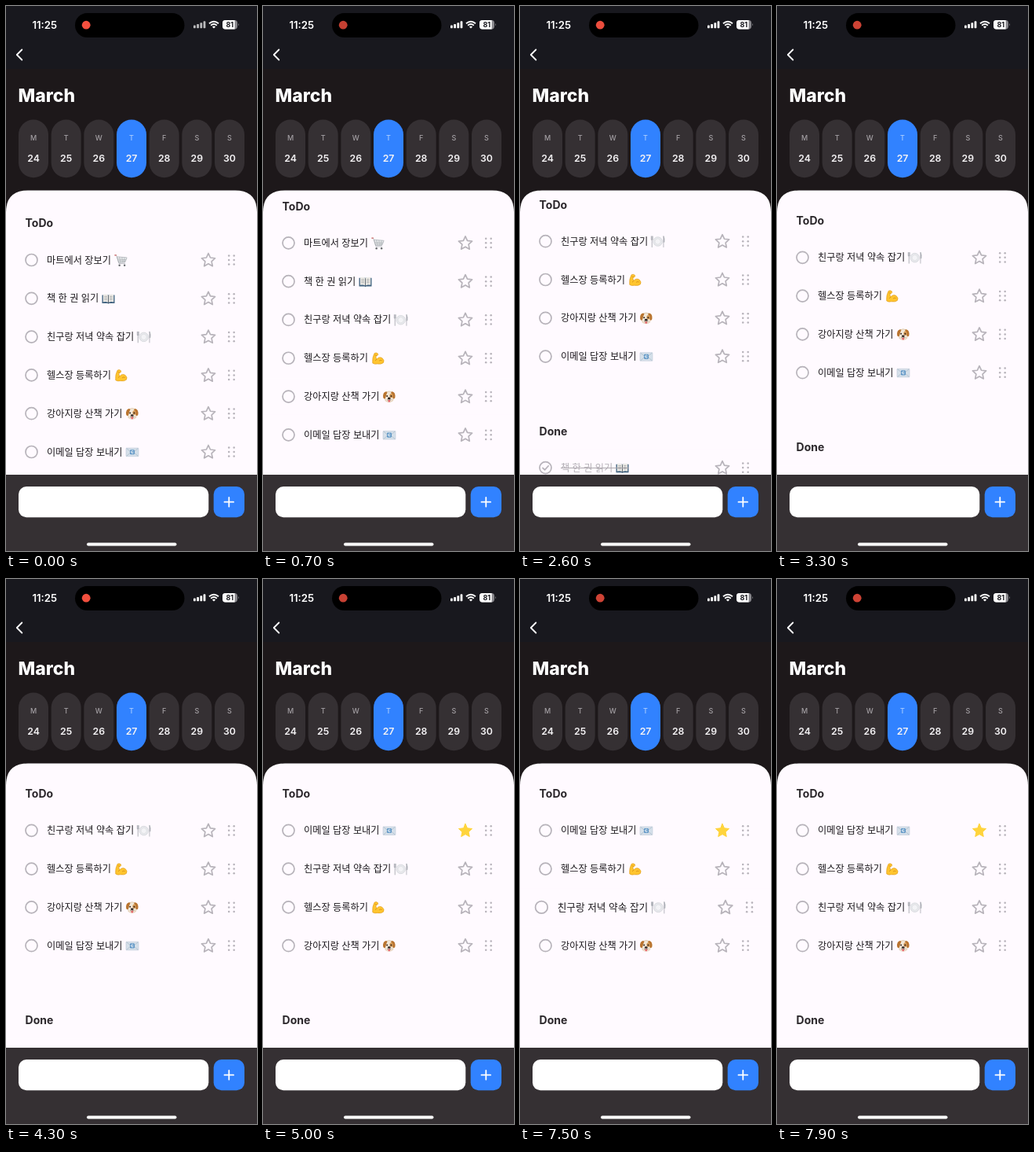
These frames come from a looping animation (320x693 px, 8 s). An HTML page:

```html
<!DOCTYPE html>
<html lang="ko">
<head>
<meta charset="utf-8">
<title>ToDo</title>
<style>
  html, body { margin: 0; width: 100%; height: 100%; overflow: hidden; background: #1d181a; }
  svg { display: block; }
  text { font-family: Inter, "Noto Sans", sans-serif; }
  .mid { text-anchor: middle; }
  .head { font-size: 14px; font-weight: 700; fill: #2b272b; }
  .label { font: 400 12.2px "Noto Sans CJK KR", "Noto Sans CJK", "Noto Sans CJK JP", sans-serif; fill: #1c191d; }
  .line { fill: none; stroke: #b7b3ba; stroke-width: 1.7; stroke-linejoin: round; stroke-linecap: round; }
  .dots { fill: #b7b3ba; }
  .tick { display: none; }
  .done .tick { display: inline; }
  .done .label { fill: #b3afb5; }
  .starred .star { fill: #ffd43c; stroke: #ffd43c; stroke-width: 1; }
</style>
</head>
<body>
<svg width="320" height="693" viewBox="0 0 320 693">
  <defs>
    <clipPath id="sheet"><path d="M0 596V262.6Q0 234.6 28 234.6H292Q320 234.6 320 262.6V596Z"/></clipPath>
  </defs>
  <rect width="320" height="693" fill="#1d181a"/>
  <rect width="320" height="80" fill="#18181e"/>

  <text class="mid" x="49.3" y="28.5" font-size="13.2" font-weight="600" fill="#fff">11:25</text>
  <rect x="88" y="9" width="139.5" height="31" rx="15.5" fill="#000"/>
  <circle id="rec" cx="102.2" cy="24.2" r="5.4" fill="#f5503f"/>
  <g id="signal" fill="#fff">
    <rect x="239" y="24.6" width="2.8" height="3.6" rx=".8"/>
    <rect x="243.2" y="22.9" width="2.8" height="5.3" rx=".8"/>
    <rect x="247.4" y="21.2" width="2.8" height="7" rx=".8"/>
    <rect x="251.6" y="19.2" width="2.8" height="9" rx=".8"/>
  </g>
  <g fill="none" stroke="#fff" stroke-width="1.9">
    <path d="M259 22.3Q265 17 271 22.3M261.2 24.7Q265 21.4 268.8 24.7"/>
    <path d="M265 28.6L262.9 26.4Q265 24.8 267.1 26.4Z" fill="#fff" stroke="none"/>
  </g>
  <rect x="276" y="18" width="19" height="11.4" rx="3.6" fill="#88878c"/>
  <path d="M291.6 18H279.6Q276 18 276 21.6V25.8Q276 29.4 279.6 29.4H291.6Z" fill="#fff"/>
  <path d="M296 21.8Q297.8 23.7 296 25.6Z" fill="#88878c"/>
  <text class="mid" x="285.4" y="27.1" font-size="9" font-weight="700" fill="#18181e">81</text>

  <path d="M20.3 55.5L13.8 62L20.3 68.5" fill="none" stroke="#fff" stroke-width="1.8" stroke-linecap="round" stroke-linejoin="round"/>
  <text x="15.6" y="122.3" font-size="23" font-weight="800" fill="#fff">March</text>
  <g id="week"></g>

  <g clip-path="url(#sheet)">
    <rect y="234" width="320" height="362" fill="#fffaff"/>
    <g id="list"></g>
  </g>

  <rect y="596" width="320" height="97" fill="#353033"/>
  <rect x="16" y="611" width="242.3" height="39.3" rx="10" fill="#fff"/>
  <rect x="264.7" y="611" width="39.3" height="39.3" rx="10" fill="#3182ff"/>
  <path d="M278.5 630.7H290.1M284.3 624.9V636.5" stroke="#fff" stroke-width="1.8" stroke-linecap="round"/>
  <rect x="103" y="682.6" width="114.5" height="4" rx="2" fill="#fff"/>
</svg>
<script>
const LOOP = 8000, ROW = 48.8, TOP = 319.8, HEAD = 273.3;
const $ = id => document.getElementById(id);
const clamp = x => Math.max(0, Math.min(1, x));
const ease = x => x * x * (3 - 2 * x);
const ramp = (t, a, b) => ease(clamp((t - a) / (b - a)));

// Emoji are drawn around their own centre, about 17 units wide
const icons = {
  cart: `<path d="M-5.5-4.8L8.2-3.6L5.6 2.8L-3 3.4Z" fill="#eceef0" stroke="#a4a9ae" stroke-width=".8"/>
    <path d="M-8.2-7H-6.4L-2.6 4.6H6M-4.6-1.5L7.2-.8M-3.8 1L6.2 1M-2-4.4L-.5 3M1.5-4L2 3M5-3.8L4 3" fill="none" stroke="#a4a9ae" stroke-width=".7"/>
    <path d="M-8.8-7H-6" stroke="#c66" stroke-width="1.3"/>
    <circle cx="-2" cy="7" r="1.3" fill="#66696d"/><circle cx="5" cy="7" r="1.3" fill="#66696d"/>`,
  book: `<path d="M-8.6-5H8.6V6.4H1L0 7.2L-1 6.4H-8.6Z" fill="#3c5f7d"/>
    <path d="M0-4.5Q-3.5-7-7.2-5.6V4.6Q-3.5 3.6 0 5.3Q3.5 3.6 7.2 4.6V-5.6Q3.5-7 0-4.5Z" fill="#eceae6"/>
    <path d="M-5.7-3H-1.6M-5.7-.8H-1.6M-5.7 1.4H-1.6M1.6-3H5.7M1.6-.8H5.7M1.6 1.4H5.7" stroke="#9b9da0" stroke-width=".8"/>
    <path d="M0-4.5V6" stroke="#55606a"/>`,
  plate: `<circle r="6.2" fill="#e9eaee" stroke="#cfd1d6" stroke-width=".8"/><circle r="3.9" fill="#f3f3f6" stroke="#d8dade" stroke-width=".7"/>
    <path d="M-8-7.5V8M-9-7.5V-2.5H-7V-7.5" fill="none" stroke="#a1a5ac" stroke-width=".9"/>
    <path d="M7.8 8V-7.5Q9.6-4 8.8.8H7.8" fill="#b4b7bd" stroke="#a1a5ac" stroke-width=".8"/>`,
  arm: `<path d="M-7.5 6.5Q-8.3-1-5-7Q-2.5-8.5-.3-6.5Q.7-4.6-1.2-3.6L-2.8-3.2Q-3.2-.7-1.8 1Q1.7-3 5.8-.3Q9.4 3 7.2 6Q4.5 8.4-1 7.5Q-5 8.4-7.5 6.5Z" fill="#ffc52f" stroke="#d99114" stroke-width=".6"/>
    <path d="M-1.8 1Q-2.6 2.6-4 3M-4.2-4.5L-2-4M1.5 3.3Q3.8 1.6 5.4 3" fill="none" stroke="#cf8613" stroke-width=".8"/>`,
  dog: `<path d="M-5-6Q0-9 5-6Q7.5 0 5 5.5Q0 9-5 5.5Q-7.5 0-5-6Z" fill="#f2e8d8" stroke="#c9a678" stroke-width=".5"/>
    <path d="M-4-7Q-9-6-8.2 1Q-6.8 4.3-5 1.5Q-4-3-2.5-6ZM4-7Q9-6 8.2 1Q6.8 4.3 5 1.5Q4-3 2.5-6Z" fill="#b9742f"/>
    <ellipse cx="3" cy="-1.5" rx="2.3" ry="3" fill="#d59a55"/>
    <circle cx="-2.8" cy="-1" r="1.1" fill="#33241c"/><circle cx="2.8" cy="-1" r="1.1" fill="#33241c"/>
    <path d="M-1.4 4.4H1.4V6.4Q0 8.2-1.4 6.4Z" fill="#e8676f"/>
    <ellipse cy="2.2" rx="2" ry="1.4" fill="#2b2220"/><path d="M-3 4Q-1.2 5.4 0 3.6Q1.2 5.4 3 4" fill="none" stroke="#5c4636" stroke-width=".6"/>`,
  mail: `<rect x="-8.6" y="-5.6" width="17.2" height="11.4" rx="1" fill="#d6e0ea" stroke="#b9c6d3" stroke-width=".6"/>
    <path d="M-8 5.5L-1.8 0M8 5.5L1.8 0M-8-5.3L0 1.6L8-5.3" fill="none" stroke="#a9b9c8" stroke-width=".8"/>
    <rect x="-3.2" y="-3.4" width="6.4" height="6.6" rx="1.4" fill="#5b93c4"/>
    <path d="M1.6-1.5Q-1.3-3.2-1.7-.1H1.5M-1.7-.1Q-1.2 2.8 1.7 1.4" fill="none" stroke="#fff" stroke-width=".8"/>`
};

const tasks = [
  ["마트에서 장보기", "cart", 146.5],
  ["책 한 권 읽기", "book", 130.5],
  ["친구랑 저녁 약속 잡기", "plate", 175.7],
  ["헬스장 등록하기", "arm", 146.7],
  ["강아지랑 산책 가기", "dog", 160.8],
  ["이메일 답장 보내기", "mail", 161]
];
const DRAGGED = 2, NEIGHBOUR = 3, MAIL = 5;

const starPath = "M" + Array.from({ length: 10 }, (_, i) => {
  const r = i % 2 ? 4.3 : 9, a = i * Math.PI / 5;
  return `${(258 + r * Math.sin(a)).toFixed(2)} ${(.5 - r * Math.cos(a)).toFixed(2)}`;
}).join("L") + "Z";
const grip = [-5.6, 0, 5.6].map(y => [284.2, 290.7].map(x =>
  `<circle cx="${x}" cy="${y}" r="1.25"/>`).join("")).join("");

const rowMarkup = ([label, icon, x]) => `<g>
  <rect y="-23" width="320" height="46" fill="#fffaff"/>
  <circle class="line" cx="32.5" r="7.5"/><path class="line tick" d="M29 .2L31.6 2.8L36.2-2.3"/>
  <text class="label" x="52" y="4.5">${label}</text>
  <g transform="translate(${x} .3) scale(.93)">${icons[icon]}</g>
  <path class="tick" d="M52 .3H${x + 8.5}" stroke="#aaa6ac"/>
  <path class="line star" d="${starPath}"/><g class="dots">${grip}</g></g>`;

$("week").innerHTML = [..."MTWTFSS"].map((day, i) => {
  const x = 16 + i * 41.67, on = i === 3;
  return `<rect x="${x}" y="144.6" width="38" height="73.6" rx="19" fill="${on ? "#3182ff" : "#353033"}"/>
    <text class="mid" x="${x + 19}" y="171.2" font-size="9" font-weight="500" fill="${on ? "#a9ccff" : "#a39fa3"}">${day}</text>
    <text class="mid" x="${x + 19}" y="198.4" font-size="12.3" font-weight="600" fill="#f4f2f4">${24 + i}</text>`;
}).join("");

$("list").innerHTML = `<text class="head" x="24.6" y="${HEAD + 5}">ToDo</text>` +
  `<text class="head" id="doneHead" x="24.6">Done</text>` + tasks.map(rowMarkup).join("");
const rows = [...$("list").querySelectorAll(":scope > g")];
$("list").append(rows[DRAGGED]);

function listsAt(t) {
  if (t < 1500) return [[0, 1, 2, 3, 4, 5], []];
  if (t < 2200) return [[1, 2, 3, 4, 5], [0]];
  if (t < 4700) return [[2, 3, 4, 5], [1, 0]];
  return [[5, 2, 3, 4], [1, 0]];
}

function draw(t) {
  const [todo, done] = listsAt(t);
  const scroll = 3.2 - 23.8 * ramp(t, 50, 850) + 20.6 * ramp(t, 2700, 3250);
  $("list").setAttribute("transform", `translate(0 ${scroll.toFixed(2)})`);

  const doneY = TOP + todo.length * ROW + 46.2;
  $("doneHead").setAttribute("y", doneY + 5);
  $("doneHead").style.display = done.length ? "" : "none";

  const lift = ramp(t, 6700, 6850) - ramp(t, 7600, 7800);
  rows.forEach((row, i) => {
    const isDone = done.includes(i);
    let y = isDone ? doneY + 46.5 + done.indexOf(i) * ROW : TOP + todo.indexOf(i) * ROW;
    let scale = 1;
    if (i === DRAGGED) {
      y += ROW * ramp(t, 6850, 7450);
      scale += .04 * lift;
    }
    if (i === NEIGHBOUR) y -= ROW * ramp(t, 7080, 7300);
    row.setAttribute("transform", `translate(160 ${y.toFixed(2)}) scale(${scale.toFixed(4)}) translate(-160 0)`);
    row.classList.toggle("done", isDone);
    row.classList.toggle("starred", i === MAIL && t >= 4700);
  });

  $("rec").style.opacity = .9 + .1 * Math.cos(t / 1400 * 2 * Math.PI);
  const sharp = ramp(t, 0, 400);
  $("signal").style.opacity = .7 + .3 * sharp;
  $("signal").style.filter = sharp < 1 ? `blur(${(.5 * (1 - sharp)).toFixed(2)}px)` : "none";
}

function tick() {
  draw(performance.now() % LOOP);
  requestAnimationFrame(tick);
}
tick();
</script>
</body>
</html>
```
